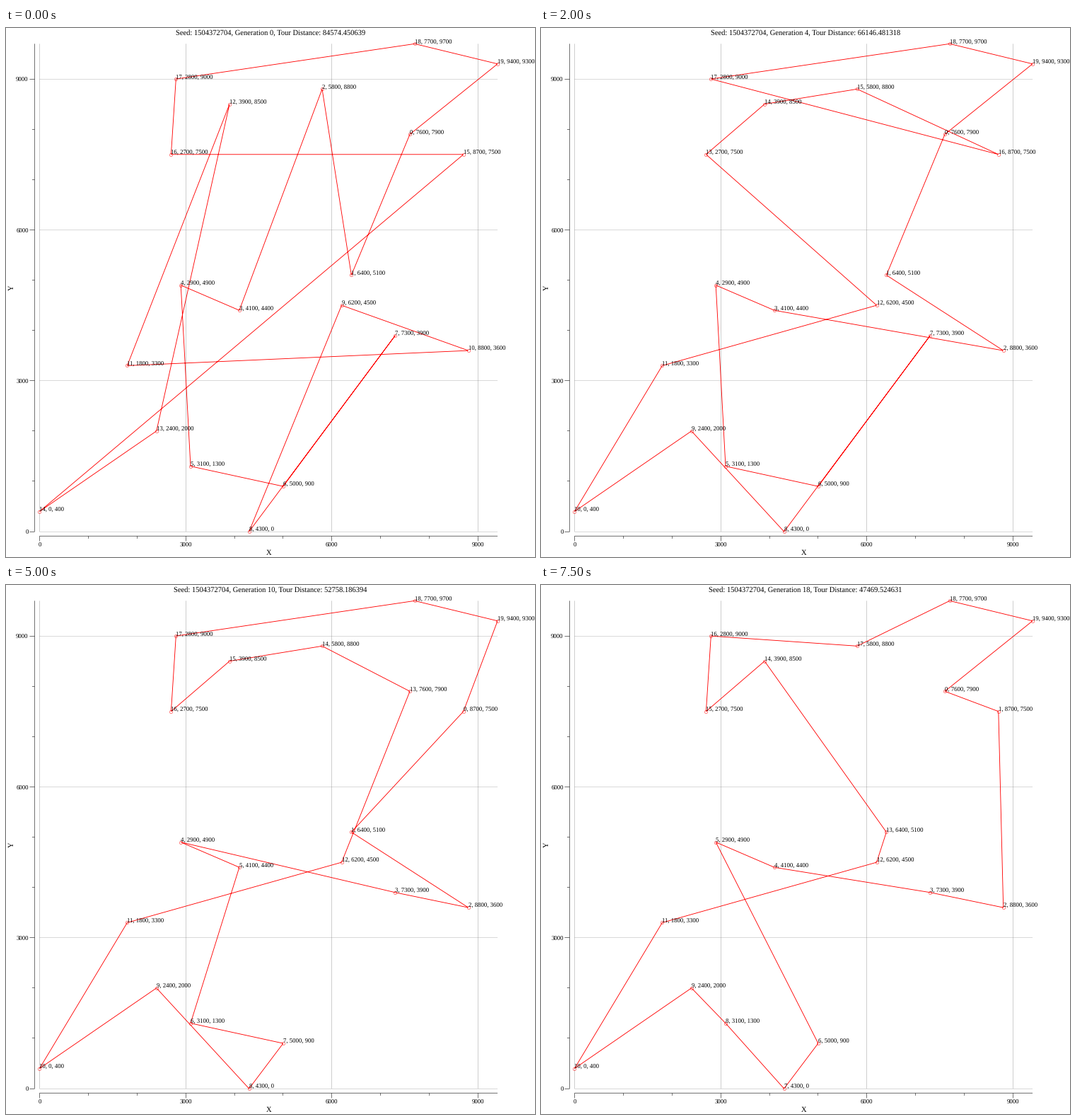
These frames come from a looping animation (748x748 px, 8 s). A matplotlib script:

```python
import math

import matplotlib.pyplot as plt
from matplotlib.animation import FuncAnimation

SIZE, DPI = 748, 100
PX = 72 / DPI            # one pixel in points
UNIT = SIZE / 850.4      # pixels per plot point on a 30 cm canvas
BIG, SMALL = 12 * UNIT * PX, 10 * UNIT * PX
SEED = 1504372704

CITIES = dict(
    a=(0, 400), b=(1800, 3300), c=(2400, 2000), d=(2700, 7500),
    e=(2800, 9000), f=(2900, 4900), g=(3100, 1300), h=(3900, 8500),
    i=(4100, 4400), j=(4300, 0), k=(5000, 900), l=(5800, 8800),
    m=(6200, 4500), n=(6400, 5100), o=(7300, 3900), p=(7600, 7900),
    q=(7700, 9700), r=(8700, 7500), s=(8800, 3600), t=(9400, 9300),
)

# Best tour of each generation that improved on the one before.
TOURS = [
    (0, "pnlifgkojmsbhcardeqt"),
    (1, "pnlifgkojmsbhcadertq"),
    (2, "nojfcakgbmishplqrted"),
    (3, "pnsifcakojgbmdhlrteq"),
    (4, "pnsifgkojcabmdhlreqt"),
    (5, "pnsifgkojcabmrlhdeqt"),
    (6, "pnsofijgkcabmrlhdeqt"),
    (7, "pnsofigkjcabmrlhdeqt"),
    (8, "pnsoifjkgcabmrlhdeqt"),
    (9, "pnsoifgkjacbmrlhdeqt"),
    (10, "rnsofigkjcabmplhdeqt"),
    (11, "prsoifjkgcabmnlhdeqt"),
    (13, "prsoifkjgcabmnlhdeqt"),
    (16, "prsomfkjgcabinlhdeqt"),
    (17, "prsoifkjgcabmnhedlqt"),
    (18, "prsoifkjgcabmnhdelqt"),
]

plt.rcParams["font.family"] = "Liberation Serif"
plt.rcParams["text.hinting"] = "none"

fig = plt.figure(figsize=(SIZE / DPI, SIZE / DPI), dpi=DPI, facecolor="white")
ax = fig.add_axes([0, 0, 1, 1])
ax.set(xlim=(0, SIZE), ylim=(SIZE, 0))
ax.axis("off")


def px(x):
    return 47.4 + x * 0.0689


def py(y):
    return 712.1 - y * 0.07111


def stroke(xs, ys, color, width):
    return ax.plot(xs, ys, color=color, lw=width * PX, snap=False,
                   solid_capstyle="butt", solid_joinstyle="miter")[0]


def write(x, y, s, size=SMALL, ha="left", **kw):
    return ax.text(x, y, s, fontsize=size, ha=ha, va="baseline",
                   color="black", zorder=5, **kw)


def center(v):
    return math.floor(v) + 0.5


LEFT, RIGHT, TOP, BOTTOM = px(0), px(9400), py(9700), py(0)
X_AXIS, Y_AXIS = 718.5, 40.5

for v in range(0, 10000, 1000):
    major = v % 3000 == 0
    tick = (8 if major else 4) * UNIT
    x, y = center(px(v)), center(py(v))
    stroke([x, x], [X_AXIS, X_AXIS + tick], "black", 0.55)
    stroke([Y_AXIS - tick, Y_AXIS], [y, y], "black", 0.55)
    if major:
        stroke([x, x], [TOP, BOTTOM], "#808080", 0.38)
        stroke([LEFT, RIGHT], [y, y], "#808080", 0.3)
        write(px(v), 734, str(v), ha="center")
        write(31.7, py(v) + 4, str(v), ha="right")

stroke([LEFT, RIGHT], [X_AXIS, X_AXIS], "black", 0.55)
stroke([Y_AXIS, Y_AXIS], [TOP, BOTTOM], "black", 0.55)
write(371.2, 745, "X", BIG, "center")
write(10.7, 367, "Y", BIG, "center", rotation=90, rotation_mode="anchor")

title = write(374, 10, "", BIG, "center")
route = stroke([], [], "red", UNIT)
ax.plot([px(x) for x, _ in CITIES.values()],
        [py(y) for _, y in CITIES.values()],
        "o", ms=5 * UNIT * PX, mfc="none", mec="red", mew=0.5 * UNIT * PX,
        snap=False)
labels = {key: write(px(x), py(y), "") for key, (x, y) in CITIES.items()}


def length(tour):
    return sum(math.dist(CITIES[u], CITIES[v])
               for u, v in zip(tour, tour[1:] + tour[0]))


def update(frame):
    gen, tour = TOURS[frame]
    stops = [CITIES[key] for key in tour + tour[0]]
    route.set_data([px(x) for x, _ in stops], [py(y) for _, y in stops])
    for rank, key in enumerate(tour):
        x, y = CITIES[key]
        labels[key].set_text(f"{rank}, {x}, {y}")
    title.set_text(f"Seed: {SEED}, Generation {gen}, "
                   f"Tour Distance: {length(tour):.6f}")
    return [route, title, *labels.values()]


anim = FuncAnimation(fig, update, frames=len(TOURS), interval=500,
                     repeat=True, repeat_delay=0, blit=False)
plt.show()
```
